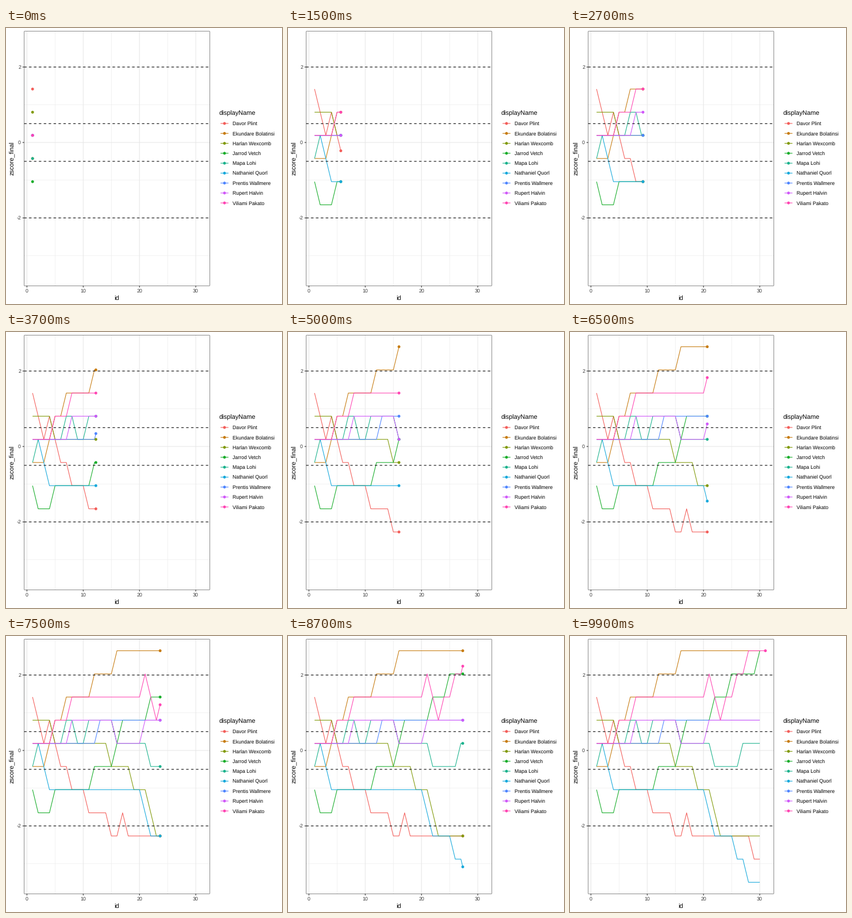
A matplotlib script that plays this animation: 480 by 480 pixels, repeating every 10 s.

```python
import numpy as np
import matplotlib.pyplot as plt
from matplotlib.animation import FuncAnimation
from matplotlib.patches import Rectangle

SIZE, DPI, FRAMES = 480, 72, 100
plt.rcParams.update({
    "font.family": "Liberation Sans",
    "text.hinting": "none",
    "path.snap": False,
    "lines.solid_capstyle": "butt",
    "lines.dash_capstyle": "butt",
    "lines.scale_dashes": False,
})

# name, colour, last id, starting level, ids with a step up, ids with a step down
PLAYERS = [
    ("Davor Plint", "#F35E5A", 30, 2, (4, 17), (2, 3, 5, 6, 8, 11, 15, 18, 29)),
    ("Ekundare Bolatinsi", "#C77C11", 30, -1, (4, 5, 7, 12, 16), ()),
    ("Harlan Wexcomb", "#819A0A", 30, 1, (), (5, 15, 19, 22, 23)),
    ("Jarrod Vetch", "#17AD2A", 30, -2, (5, 12, 16, 17, 22, 25, 30), (2,)),
    ("Mapa Lohi", "#1BB28D", 30, -1, (2, 7, 11, 27), (9, 16, 22)),
    ("Nathaniel Quorl", "#17A9DC", 30, 0, (), (3, 4, 21, 22, 26, 28)),
    ("Prentis Wallmere", "#5086FF", 30, 0, (13,), ()),
    ("Rupert Halvin", "#D058F9", 30, 0, (8, 21), (16,)),
    ("Viliami Pakato", "#FF45B3", 31, 0, (5, 8, 21, 24, 26, 28), (22, 23)),
]
COLORS = [p[1] for p in PLAYERS]

LEFT, TOP, RIGHT, BOTTOM = 31.5, 5.5, 354.5, 448.5
LINE, DOT = 1.07, 4.9 ** 2
GRID, DARK, LABEL = "#E7E7E7", "#262626", "#3C3C3C"


def px(i):
    return 36.4 + 9.788 * np.asarray(i, float)


def py(z):
    return 199.1 - 65.6 * np.asarray(z, float)


def level_y(level):
    return 186.7 - 40.27 * np.asarray(level, float)


def path(last, start, ups, downs):
    ids = np.arange(1, last + 1)
    steps = np.isin(ids, ups).astype(int) - np.isin(ids, downs)
    return ids, start + np.cumsum(steps)


fig = plt.figure(figsize=(SIZE / DPI, SIZE / DPI), dpi=DPI, facecolor="white")
ax = fig.add_axes([0, 0, 1, 1])
ax.set(xlim=(0, SIZE), ylim=(SIZE, 0))
ax.axis("off")


def rule(x, y, color, width=LINE, z=1, **kw):
    return ax.plot(x, y, color=color, lw=width, zorder=z, **kw)[0]


def label(x, y, text, size=8.8, color="black", **kw):
    ax.text(x, y, text, fontsize=size, color=color, **kw)


def dots(x, y):
    return ax.scatter(x, y, s=DOT, c=COLORS, linewidths=0, zorder=4)


# Grid, ticks and axis labels
for v in (5, 15, 25):
    rule([px(v)] * 2, [TOP, BOTTOM], GRID, LINE / 2)
for v in (-3, -1, 1):
    rule([LEFT, RIGHT], [py(v)] * 2, GRID, LINE / 2)
for v in (0, 10, 20, 30):
    rule([px(v)] * 2, [TOP, BOTTOM], GRID)
    rule([px(v)] * 2, [BOTTOM, BOTTOM + 2.75], DARK)
    label(px(v), 459.8, str(v), color=LABEL, ha="center")
for v in (-2, 0, 2):
    rule([LEFT, RIGHT], [py(v)] * 2, GRID)
    rule([LEFT - 2.75, LEFT], [py(v)] * 2, DARK)
    label(26, py(v) + 3.1, str(v), color=LABEL, ha="right")
for v in (-2, -0.5, 0.5, 2):
    rule([LEFT, RIGHT], [py(v)] * 2, "black", z=5, dashes=(4.27, 4.27))

# Only the inner half of the border stroke shows
inset = LINE / 4
ax.add_patch(Rectangle((LEFT + inset, TOP + inset),
                       RIGHT - LEFT - 2 * inset, BOTTOM - TOP - 2 * inset,
                       fill=False, ec=DARK, lw=LINE / 2, zorder=6))
label(193, 473.4, "id", 11, ha="center")
label(14.6, 227, "zscore_final", 11, rotation=90, rotation_mode="anchor",
      ha="center", va="baseline")

# Legend
label(371, 151.4, "displayName", 11)
key_y = 166 + 17.28 * np.arange(len(PLAYERS))
for (name, color, *_), y in zip(PLAYERS, key_y):
    rule([373.1, 386.9], [y, y], color)
    label(394, y + 3.2, name)
dots(np.full(len(PLAYERS), 380.0), key_y)

# Series
paths = [path(*p[2:]) for p in PLAYERS]
lines = [rule([], [], c, z=3) for c in COLORS]
heads = dots(np.zeros(len(PLAYERS)), np.zeros(len(PLAYERS)))

# Each id lands on a whole frame; positions are linear in between
all_ids = np.arange(1, 32)
id_frames = [round((FRAMES - 1) * (i - 1) / 30) for i in all_ids]


def update(frame):
    now = np.interp(frame, id_frames, all_ids)
    tips = []
    for line, (ids, levels) in zip(lines, paths):
        end = min(now, ids[-1])
        past = ids < end
        xs = px(np.append(ids[past], end))
        ys = level_y(np.append(levels[past], np.interp(end, ids, levels)))
        line.set_data(xs, ys)
        shown = now <= ids[-1]
        tips.append((xs[-1], ys[-1]) if shown else (-50, -50))
    heads.set_offsets(tips)
    return [*lines, heads]


anim = FuncAnimation(fig, update, frames=FRAMES, interval=100,
                     repeat=True, repeat_delay=0, blit=False)
plt.show()
```
